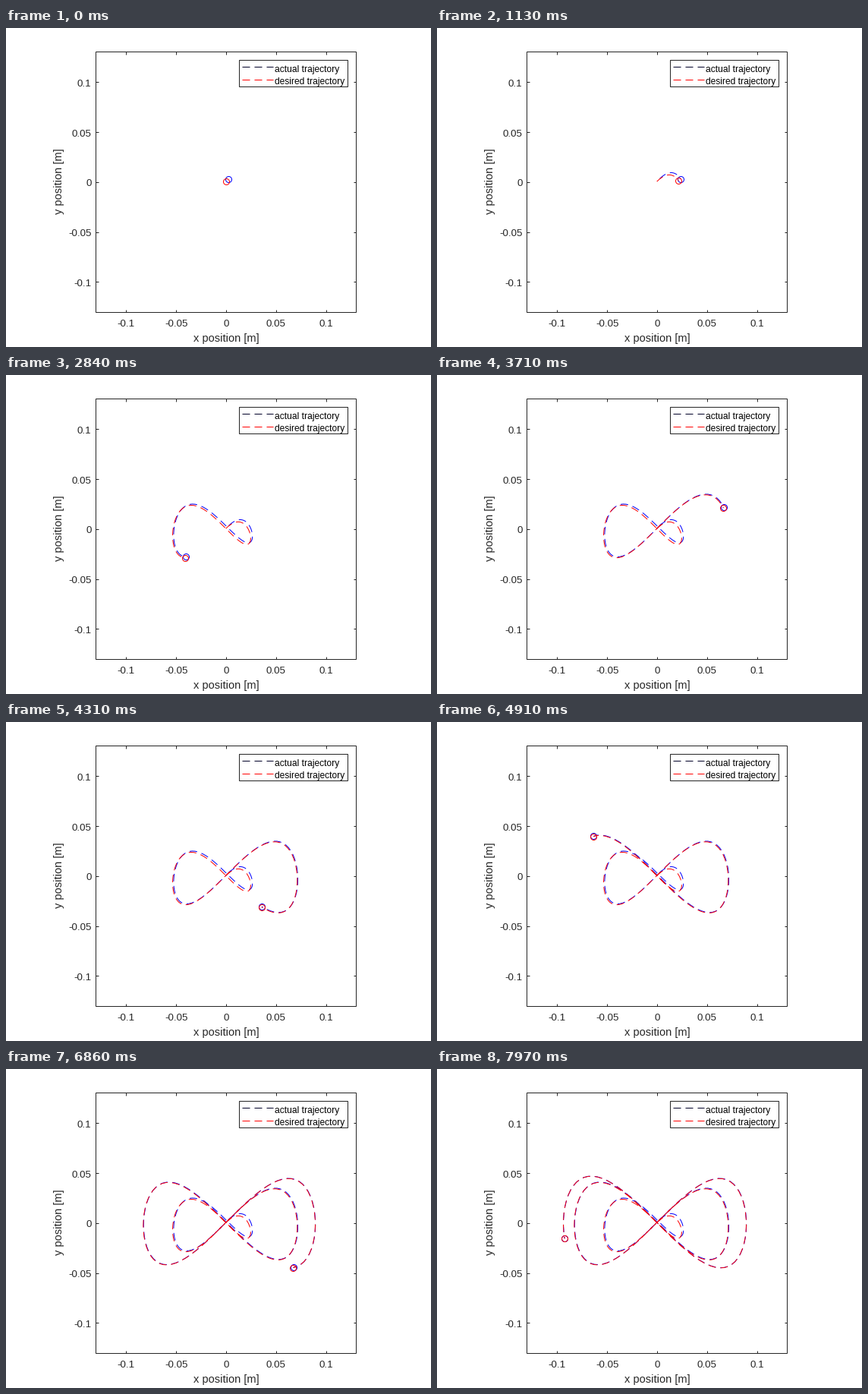
Animation, 560 px wide and 420 px high, one loop 8 s. Source, as a matplotlib script:

```python
import numpy as np
import matplotlib.pyplot as plt
from matplotlib.animation import FuncAnimation

plt.rcParams["font.family"] = "Liberation Sans"

WIDTH, HEIGHT, DPI = 560, 420, 80
PX = 72 / DPI                      # one pixel in points
LOOP, TICK = 8000, 10              # ms
HOLD, STEP = 500, 30               # ms
X0, Y0, SCALE = 289.7, 202.2, 1316.5
LEFT, RIGHT, TOP, BOTTOM = 118, 461, 31, 374   # pixel columns and rows
INK = "#262626"

fig = plt.figure(figsize=(WIDTH / DPI, HEIGHT / DPI), dpi=DPI, facecolor="white")
ax = fig.add_axes([0, 0, 1, 1])
ax.set_xlim(0, WIDTH)
ax.set_ylim(HEIGHT, 0)
ax.axis("off")


def label(x, y, text, size, color=INK, **kw):
    ax.text(x, y, text, fontsize=size * PX, color=color, va="baseline", **kw)


def box(left, top, right, bottom, color):
    ax.add_patch(plt.Rectangle((left, top), right - left, bottom - top,
                               fill=False, ec=color, lw=PX, snap=True))


def dashed(color, x=(), y=()):
    return ax.plot(x, y, color=color, lw=PX, ls=(0, (10, 6)),
                   dash_capstyle="butt")[0]


def ring(color):
    return ax.plot([], [], "o", ms=8 * PX, mfc="none", mec=color, mew=PX)[0]


def draw_axes():
    box(LEFT, TOP, RIGHT, BOTTOM, INK)
    values = np.array([-0.1, -0.05, 0, 0.05, 0.1])
    xs, ys = 290 + SCALE * values, 202.7 - SCALE * values
    style = dict(color=INK, lw=PX)
    ax.vlines(xs, TOP, TOP + 4, **style)
    ax.vlines(xs, BOTTOM - 3, BOTTOM, **style)
    ax.hlines(ys, LEFT, LEFT + 4, **style)
    ax.hlines(ys, RIGHT - 3, RIGHT, **style)
    for value, x, y in zip(values, xs, ys):
        label(x, 393, f"{value:g}", 13.33, ha="center")
        label(112.5, y + 5.7, f"{value:g}", 13.33, ha="right")
    label(290, 413, "x position [m]", 14.67, ha="center")
    label(74, 201.2, "y position [m]", 14.67, ha="center",
          rotation=90, rotation_mode="anchor")


def draw_legend():
    box(307, 42, 450, 77, INK)
    for name, color, y, baseline in (("actual", "#000028", 51, 57.6),
                                     ("desired", "red", 68, 73.8)):
        dashed(color, [311, 352], [y, y])
        label(354, baseline, f"{name} trajectory", 12, "black")


draw_axes()

# Figure eight with growing amplitude; the tracking error decays
steps = np.arange((LOOP - HOLD) // STEP + 1)
angle = 2 * np.pi * steps / 90
amplitude = 0.1 * (1 - np.exp(-steps / 90))
desired = np.array([amplitude * np.sin(angle),
                    amplitude * np.sin(angle) * np.cos(angle)])
actual = desired + 0.0027 * np.exp(-steps / 70)

tracks = []
for path, color in ((actual, "blue"), (desired, "red")):
    pixels = np.array([X0 + SCALE * path[0], Y0 - SCALE * path[1]])
    tracks.append((pixels, dashed(color), ring(color)))

draw_legend()


def update(frame):
    now = frame * TICK
    n = 0 if now < HOLD else 1 + (now - HOLD) // STEP
    for pixels, line, marker in tracks:
        line.set_data(pixels[:, :n + 1])
        marker.set_data(pixels[:, n:n + 1])
    return [artist for track in tracks for artist in track[1:]]


anim = FuncAnimation(fig, update, frames=LOOP // TICK, interval=TICK,
                     repeat=True, repeat_delay=0, blit=False)
plt.show()
```
